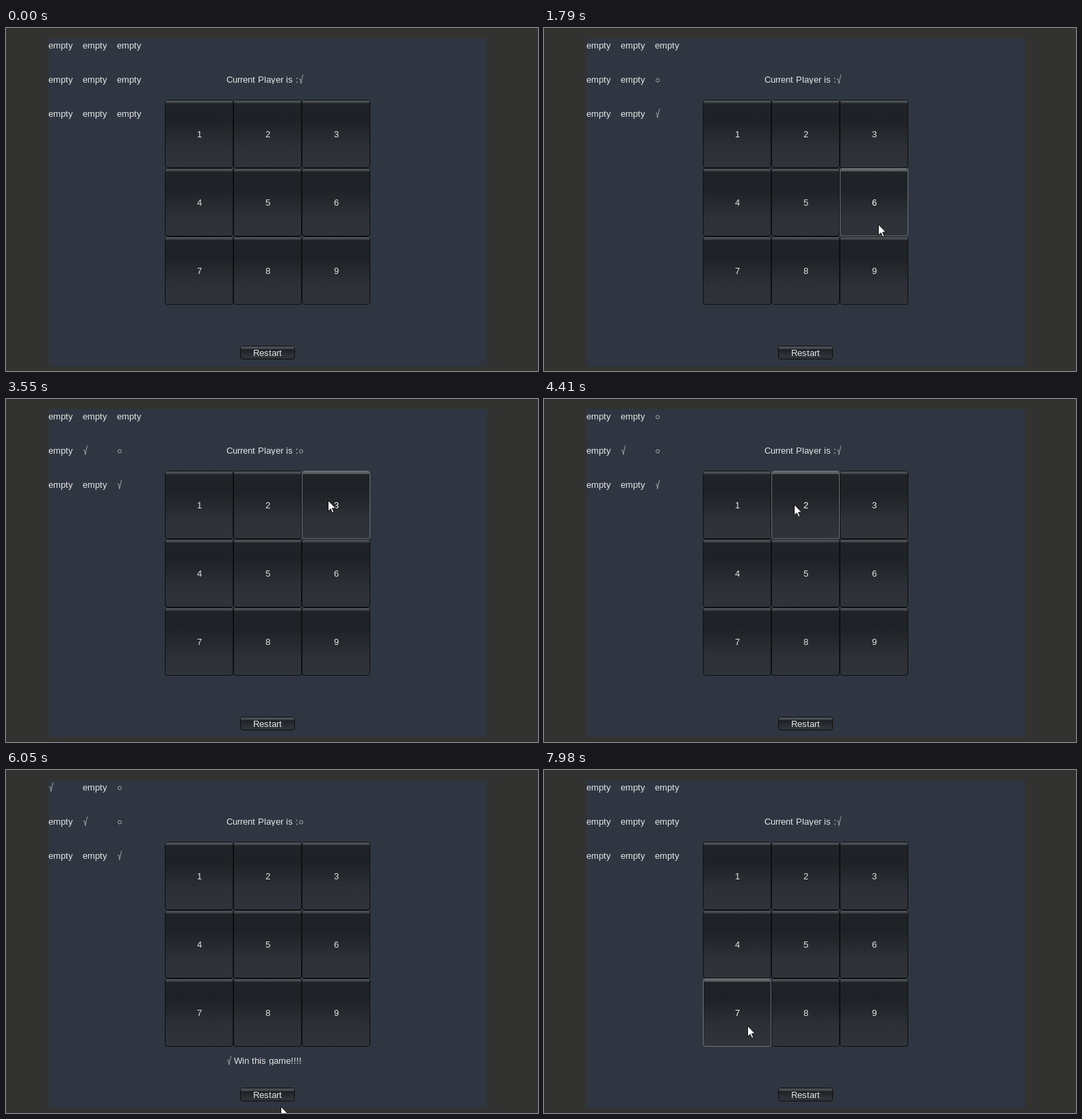
Write an HTML page that moves like this. It is 777 by 502 pixels and loops after 8000 ms.

```html
<!DOCTYPE html>
<html lang="en">
<head>
<meta charset="utf-8">
<title>Noughts and ticks</title>
<style>
  html, body { margin: 0; width: 100%; height: 100%; overflow: hidden; background: #323331; }
  svg { display: block; width: 777px; height: 502px; }
  text { font: 13px "Liberation Sans", Arial, sans-serif; fill: #e4e5e6; white-space: pre; }
  .tick { fill: none; stroke: #b9bcc0; stroke-width: .8; }
  .ring { fill: none; stroke: #c6c8cc; stroke-width: .8; }
  .face { fill: url(#body); stroke: #0d0e10; }
  .shine { fill: url(#top); }
  .hot .face { stroke: #707376; }
  .hot .shine { fill: url(#topHot); }
  .hot text { fill: #fff; }
</style>
</head>
<body>
<svg id="stage" viewBox="0 0 777 502">
  <defs>
    <linearGradient id="body" x2="0" y2="1">
      <stop offset="0" stop-color="#202328"/>
      <stop offset=".3" stop-color="#1e2125"/>
      <stop offset=".7" stop-color="#2d3036"/>
      <stop offset="1" stop-color="#303339"/>
    </linearGradient>
    <linearGradient id="top" x2="0" y2="1">
      <stop offset="0" stop-color="#55585c"/>
      <stop offset="1" stop-color="#393c41"/>
    </linearGradient>
    <linearGradient id="topHot" x2="0" y2="1">
      <stop offset="0" stop-color="#6c6f72"/>
      <stop offset="1" stop-color="#4e5155"/>
    </linearGradient>
    <clipPath id="labelClip">
      <rect x="322" y="60" width="200" height="22"/>
      <rect x="322" y="410" width="200" height="22"/>
    </clipPath>
  </defs>
  <rect width="777" height="502" fill="#323331"/>
  <rect x="62" y="15" width="640" height="480" fill="#2f3641"/>
</svg>
<script>
const LOOP = 8000;
const STEP = 70; // ms between pointer updates
const stage = document.getElementById('stage');
const pen = document.createElement('canvas').getContext('2d');
pen.font = '13px "Liberation Sans", Arial, sans-serif';

function add(parent, tag, attrs = {}, text) {
  const el = document.createElementNS('http://www.w3.org/2000/svg', tag);
  for (const k in attrs) el.setAttribute(k, attrs[k]);
  if (text) el.textContent = text;
  parent.appendChild(el);
  return el;
}

const show = (el, on) => el.setAttribute('visibility', on ? 'visible' : 'hidden');
const advance = ch => Math.round(pen.measureText(ch).width);

// Text whose letters sit on whole pixels.
function addText(parent, x, y, text, centred) {
  const widths = [...text].map(advance);
  const total = widths.reduce((a, b) => a + b, 0);
  let at = centred ? Math.round(x - total / 2) : x;
  const xs = widths.map(w => (at += w) - w);
  return add(parent, 'text', { x: xs.join(' '), y }, text);
}

function addMark(parent, kind, x, y) {
  return kind === 'tick'
    ? add(parent, 'path', { class: 'tick', d: `M${x + 1} ${y - 4.8}l1.7 -.9l1 7.2l3 -13.3` })
    : add(parent, 'circle', { class: 'ring', cx: x + 4, cy: y - 3.5, r: 2.5 });
}

function addButton(x, y, w, h, label) {
  const g = add(stage, 'g');
  add(g, 'rect', { class: 'face', x: x + .5, y: y + .5, width: w - 1, height: h - 1, rx: 3.5 });
  add(g, 'path', { class: 'shine', d: `M${x + 1} ${y + 5}v-2q0 -2 2 -2h${w - 6}q2 0 2 2v2z` });
  addText(g, x + w / 2, y + h / 2 + 5, label, true);
  const contains = ([px, py]) => px >= x && px < x + w && py >= y && py < y + h;
  return { g, contains };
}

const buttons = [];
const cells = [];
for (let i = 0; i < 9; i++) {
  const col = i % 3, row = Math.floor(i / 3);
  buttons.push(addButton(232 + 100 * col, 105 + 100 * row, 100, 100, String(i + 1)));
  const x = 62 + 50 * col, y = 30 + 50 * row;
  cells.push({
    empty: addText(stage, x, y, 'empty'),
    tick: addMark(stage, 'tick', x, y),
    ring: addMark(stage, 'ring', x, y)
  });
}
const RESTART = buttons.push(addButton(342, 465, 80, 20, 'Restart')) - 1;

const labels = add(stage, 'g', { 'clip-path': 'url(#labelClip)' });
addText(labels, 322, 80, 'Current Player is :');
const turn = {
  tick: addMark(labels, 'tick', 427, 80),
  ring: addMark(labels, 'ring', 427, 80)
};
const win = add(labels, 'g');
addMark(win, 'tick', 322, 430);
addText(win, 333, 430, 'Win this game!!!!');

const pointer = add(stage, 'path', {
  d: 'M.5 .5V16.2L4.1 12.8L6.6 18.6L9 17.6L6.5 11.9H11.4Z',
  fill: '#fff', stroke: '#0b0b0c'
});

// The pointer glides to each stop; sag bends its path downwards.
const ENTRY = { x: 561, y: 463 };
const glides = [
  { from: 70, to: 460, x: 490, y: 350 },
  { from: 770, to: 870, x: 484, y: 273 },
  { from: 970, to: 1030, x: 488, y: 308 },
  { from: 1430, to: 1560, x: 488, y: 287 },
  { from: 1860, to: 2430, x: 400, y: 272, sag: 40 },
  { from: 3150, to: 3550, x: 470, y: 148, sag: -20 },
  { from: 3620, to: 3740, x: 478, y: 145 },
  { from: 4190, to: 4660, x: 252, y: 162 },
  { from: 5530, to: 6050, x: 401, y: 492, sag: 130 },
  { from: 6240, to: 6590, x: 389, y: 477 },
  { from: 7790, to: 7980, x: 297, y: 374 }
];
const clicks = [700, 1790, 3070, 4100, 4930, 6930];

function pointerAt(t) {
  if (t < glides[0].from) return null;
  const next = glides.findIndex(g => t < g.from);
  const i = (next < 0 ? glides.length : next) - 1;
  const a = glides[i - 1] || ENTRY, b = glides[i];
  const span = b.to - b.from;
  const steps = Math.max(2, Math.round(span / STEP) + 1);
  const done = Math.floor((t - b.from) / span * (steps - 1)) + 1;
  const f = Math.min(1, done / steps);
  const bend = (b.sag || 0) * Math.sin(Math.PI * f);
  return [a.x + (b.x - a.x) * f, a.y + (b.y - a.y) * f + bend].map(Math.round);
}

const buttonAt = pos => pos ? buttons.findIndex(b => b.contains(pos)) : -1;

// Replays the clicks up to t: whatever lies under the pointer is pressed.
function play(t) {
  let board = [];
  for (const time of clicks) {
    if (time > t) break;
    const hit = buttonAt(pointerAt(time));
    if (hit === RESTART) board = [];
    else if (hit >= 0) board[hit] = board.filter(Boolean).length % 2 ? 'ring' : 'tick';
  }
  return board;
}

function draw(t) {
  const board = play(t);
  cells.forEach((cell, i) => {
    for (const kind in cell) show(cell[kind], kind === (board[i] || 'empty'));
  });
  const ringNext = board.filter(Boolean).length % 2 === 1;
  show(turn.tick, !ringNext);
  show(turn.ring, ringNext);
  show(win, [0, 4, 8].every(i => board[i] === 'tick'));

  const pos = pointerAt(t);
  const hot = buttonAt(pos);
  show(pointer, pos);
  if (pos) pointer.setAttribute('transform', `translate(${pos})`);
  buttons.forEach((b, i) => b.g.setAttribute('class', i === hot ? 'hot' : ''));
}

const begin = performance.now();
function frame() {
  draw((performance.now() - begin) % LOOP);
  requestAnimationFrame(frame);
}
frame();
</script>
</body>
</html>
```
